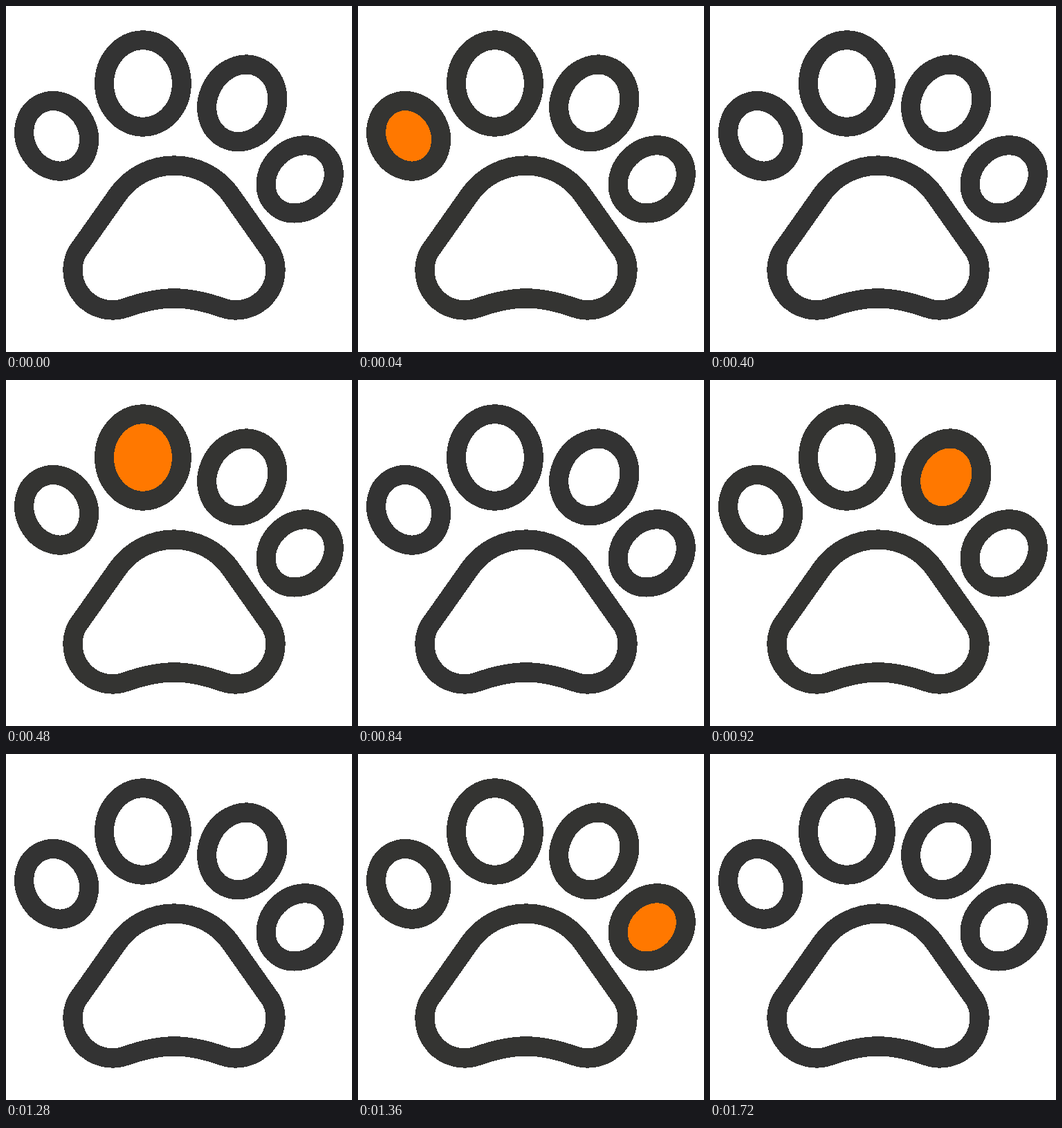
Recreate the animation shown at these times as an HTML page. Size 500x500 px, loop 1.96 s.

```html
<!DOCTYPE html>
<html lang="en">
<head>
<meta charset="utf-8">
<title>Paw loader</title>
<style>
  html, body { margin: 0; width: 100%; height: 100%; overflow: hidden; background: #fff; }
  svg { display: block; width: 100%; height: 100%; }
</style>
</head>
<body>
<svg viewBox="0 0 500 500">
  <g id="paw" fill="none" stroke="#333" stroke-width="28" shape-rendering="crispEdges">
    <path stroke-width="28.3" d="M102.6 356 L163 270.5 A100 100 0 0 1 323 270.5 L383.4 356
      A57.5 57.5 0 0 1 313.4 436.3 Q274 422.4 243 422.4 Q212 422.4 172.6 436.3 A57.5 57.5 0 0 1 102.6 356 Z"/>
  </g>
</svg>
<script>
const LOOP = 1960, STEP = 440, START = 40, HOLD = 360;
const ORANGE = '#ff7800', DARK = '#333333', DARK_LIT = '#343432';
const paw = document.getElementById('paw');

// cx, cy, rx, ry, tilt in degrees
const toes = [
  [73.1, 187.8, 45.6, 52, -27],
  [197.9, 112, 55.9, 62.7, 0],
  [341.3, 140.4, 49.5, 57.2, 26],
  [424.7, 250.4, 45.2, 52.7, 45]
].map(([cx, cy, rx, ry, tilt]) => {
  const toe = document.createElementNS('http://www.w3.org/2000/svg', 'ellipse');
  const attrs = { cx, cy, rx, ry, transform: `rotate(${tilt} ${cx} ${cy})` };
  for (const name in attrs) toe.setAttribute(name, attrs[name]);
  return paw.appendChild(toe);
});

// Each toe lights up in turn, with a short dark gap between them.
function draw(time) {
  const t = time % LOOP - START;
  const lit = t >= 0 && t % STEP < HOLD ? Math.floor(t / STEP) : -1;
  toes.forEach((toe, i) => toe.setAttribute('fill', i === lit ? ORANGE : 'none'));
  paw.setAttribute('stroke', toes[lit] ? DARK_LIT : DARK);
}

let start;
function tick(now) {
  start ??= now;
  draw(now - start);
  requestAnimationFrame(tick);
}
draw(0);
requestAnimationFrame(tick);
</script>
</body>
</html>
```
